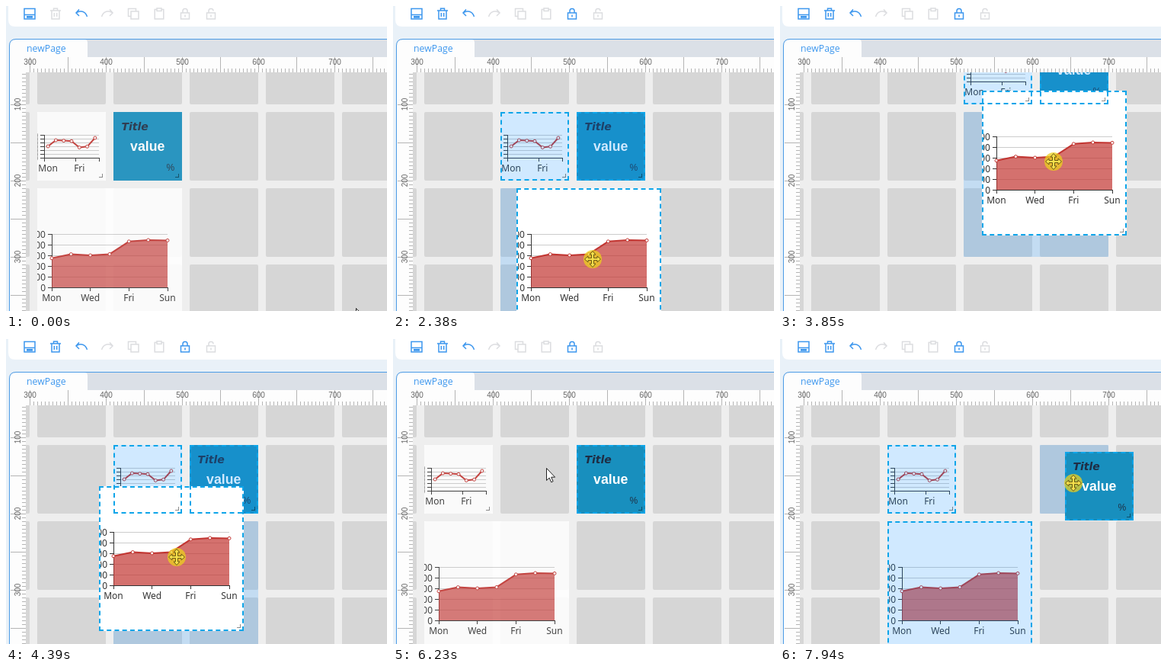
Recreate the animation shown at these times as an HTML page. Size 500x400 px, loop 8000 ms.

```html
<!DOCTYPE html>
<html lang="en">
<head>
<meta charset="utf-8">
<title>Page editor</title>
<style>
html, body { margin: 0; width: 100%; height: 100%; overflow: hidden; background: #e9f1f8; }
svg { display: block; }
#ui, #canvas { position: absolute; left: 0; top: 0; width: 500px; height: 400px; }
#canvas { clip-path: inset(87px 0 0 26px); }
.widget, .frame, #drop, #pointer { position: absolute; left: 0; top: 0; }
.widget { background: #fff; opacity: .9; }
.widget::after { content: ""; position: absolute; inset: 0; }
.frame { box-sizing: border-box; z-index: 3; }
.frame::after { content: ""; position: absolute; right: 4px; bottom: 4px; width: 4px; height: 4px; border: solid rgba(0, 0, 0, .45); border-width: 0 1.5px 1.5px 0; }
.widget.on { opacity: 1; }
.on svg { clip-path: inset(2px); }
.frame.on { border: 2px dashed #0ea5e9; }
.frame.on::after { right: 2px; bottom: 2px; }
.tint::after, #drop { background: rgba(24, 144, 255, .2); }
.top { z-index: 2; }
#pointer { overflow: visible; }
.icon { fill: none; stroke: #dcdde0; stroke-width: 1.5; }
.icon.live { stroke: #3d97ee; }
.label { font: 12px "Noto Sans", "Open Sans", sans-serif; fill: #333; }
.ruler { font: 10px "Liberation Sans", sans-serif; fill: #666; text-anchor: middle; }
</style>
</head>
<body>
<svg id="ui"></svg>
<div id="canvas"><svg id="cells" width="500" height="400"></svg><div id="drop"></div></div>
<svg id="pointer" width="1" height="1">
  <path id="arrow" d="M.5 .5V16.5L4.2 13.1 6.7 18.8 9.1 17.7 6.7 12.2H11.6Z" fill="#fff" stroke="#222"/>
  <g id="move">
    <circle r="12" fill="rgba(236,208,30,.75)"/>
    <path d="M0-10.5L4-6H1.5V-1.5H6V-4L10.5 0 6 4V1.5H1.5V6H4L0 10.5-4 6H-1.5V1.5H-6V4L-10.5 0-6-4V-1.5H-1.5V-6H-4Z" fill="#f6e04c" stroke="#6b5a14"/>
  </g>
</svg>
<script>
const $ = id => document.getElementById(id);
const range = (a, b, step) => Array.from({ length: Math.ceil((b - a) / step) }, (_, i) => a + i * step);

// Toolbar, tab and rulers
const undo = "M5 2.5L1 7 5 11M1 7C6 3.5 13 4 15.5 12";
const lock = "M2.5 7H13.5V15H2.5ZM8 9.5V12.5M5 7V4.5A3 3 0 0 1 11 4.5";
const icons = [
  "M1 1.5H15V15H1ZM1 9.5H15M4 11.8H12M4 13H12",
  "M1 4H15M5.5 4V1.2H10.5V4M3 4V15H13V4M6.3 7V12M9.7 7V12",
  undo, undo,
  "M5 5H15V15H5ZM11.5 5V1.5H1.5V11.5H5",
  "M5 2.5H2.2V15H13.8V2.5H11M5 1H11V4.5H5Z",
  lock + "V7", lock
];
const tick = n => n % 50 ? 5 : 20;
const ticks = range(31, 500, 5).map(x => `M${x + .5} 87v${-tick(x - 31)}`).join("") +
  range(89, 400, 5).map(y => `M26 ${y + .5}h${-tick(y - 129)}`).join("");

$("ui").innerHTML = `
  <path d="M3 0H500V27H12Q3 27 3 18Z" fill="#fff"/>
  <path d="M4.5 400V52Q4.5 43.5 13 43.5H500V400Z" fill="#dbe0e7"/>
  <path d="M5 67V52Q5 44 13 44H103Q107 44 107 48V67H500V400H5Z" fill="#fdfdfd"/>
  <path d="M4.5 400V52Q4.5 43.5 13 43.5H500" fill="none" stroke="#4b9be6"/>
  <text x="27" y="60" font-size="12.3" font-family="Open Sans, Noto Sans, sans-serif" fill="#3d97ee">newPage</text>
  <path d="${ticks}" stroke="#b5b5b5"/>
  ${range(300, 701, 100).map(n => `<text class="ruler" x="${n - 268.5}" y="77">${n}</text>`).join("")}
  ${range(100, 301, 100).map(n => `<text class="ruler" transform="translate(19 ${n + 29}) rotate(-90)">${n}</text>`).join("")}
  ${icons.map((d, i) => `<path class="icon" d="${d}" transform="translate(${31 + i * 34} 2) scale(${i === 3 ? -1 : 1} 1) translate(-8 0)"/>`).join("")}`;
const iconEls = document.querySelectorAll(".icon");

$("cells").innerHTML = `<rect width="500" height="400" fill="#eee"/>` +
  range(-59, 500, 100).flatMap(x => range(39, 400, 100).map(y =>
    `<rect x="${x}" y="${y}" width="90" height="90" rx="2" fill="#d6d6d6"/>`)).join("");

// Widgets
const text = (x, y, s, anchor = "middle") => `<text class="label" x="${x}" y="${y}" text-anchor="${anchor}">${s}</text>`;

function chart({ x0, x1, top, base, max, step, data, gap, days, area }) {
  const slot = (x1 - x0) / (data.length - (gap ? 0 : 1));
  const yOf = v => base - v * (base - top) / max;
  const pts = data.map((v, i) => [x0 + (i + (gap ? .5 : 0)) * slot, yOf(v)]);
  const rows = range(0, max + 1, step);
  const snap = v => Math.round(v) + .5;
  const line = "M" + pts.join("L");
  const marks = Object.keys(days).map(i => x0 + i * slot).concat(x1);
  return rows.map(v => `<path d="M${x0} ${snap(yOf(v))}H${x1}" stroke="#ccc"/>` +
      text(x0 - 8, yOf(v) + 4.5, v.toLocaleString("en-US"), "end")).join("") +
    `<path d="M${x0 + .5} ${top}V${base}M${x0} ${base + .5}H${x1 + 1}` +
      rows.map(v => `M${x0 - 5} ${snap(yOf(v))}h5`).join("") +
      marks.map(x => `M${Math.floor(x) + .5} ${base}v5`).join("") + `" stroke="#333"/>` +
    (area ? `<path d="${line}V${base}H${x0}Z" fill="#c23531" opacity=".7"/>` : "") +
    `<path d="${line}" fill="none" stroke="#c23531" stroke-width="2" stroke-linejoin="bevel"/>` +
    pts.map(([x, y]) => `<circle cx="${x}" cy="${y}" r="2" fill="#fff" stroke="#c23531"/>`).join("") +
    Object.keys(days).map(i => text(pts[i][0], base + 17.5, days[i])).join("");
}

function box(className, size) {
  const el = document.createElement("div");
  el.className = className;
  el.style.width = el.style.height = size + "px";
  $("canvas").append(el);
  return el;
}

function widget(x, y, size, body, fill = "#fff") {
  const el = box("widget", size);
  el.style.background = fill;
  el.innerHTML = `<svg width="${size}" height="${size}">${body}</svg>`;
  return { el, frame: box("frame", size), x, y, size };
}

const small = widget(41, 139, 90, chart({
  x0: 9, x1: 81, top: 30, base: 60, max: 300, step: 50, gap: true,
  data: [150, 230, 224, 218, 135, 147, 260], days: { 0: "Mon", 4: "Fri" }
}));
const card = widget(141, 139, 90, `
  <text x="10.5" y="24" font-family="DejaVu Sans, sans-serif" font-size="14" font-weight="bold" font-style="italic" fill="#1f2d44">Title</text>
  <text x="44.7" y="50.5" text-anchor="middle" font-family="Liberation Sans, sans-serif" font-size="17.7" font-weight="bold" fill="#fff">value</text>
  <text x="69.5" y="77" font-family="Liberation Sans, sans-serif" font-size="12" fill="#1f3348">%</text>`, "#188fbe");
const big = widget(41, 239, 190, chart({
  x0: 19, x1: 171, top: 60, base: 130, max: 1500, step: 300, area: true,
  data: [820, 932, 901, 934, 1290, 1330, 1320], days: { 0: "Mon", 2: "Wed", 4: "Fri", 6: "Sun" }
}));

// Each move runs from one time to another and ends at x, y; pauses lie between.
const pointerMoves = [
  [0, 0, 459, 396], [70, 500, 112, 106], [700, 1150, 274, 379], [1150, 1450, 67, 366],
  [1770, 1900, 148, 332], [4780, 5000, 352, 208], [5620, 5820, 160, 180], [6150, 6150, 271, 189],
  [6150, 6310, 133, 150], [6480, 6630, 94, 103], [6780, 7320, 327, 292], [7570, 7700, 260, 180]
];
const drags = [
  { item: big, from: 1900, to: 4700, grab: [107, 93], moves: [[1900, 2380, 121, 0], [2700, 2930, -12, 5],
    [2930, 3080, 28, -7], [3080, 3850, 224, -128], [3930, 4650, 0, 0]] },
  { item: card, from: 5860, to: 6150, grab: [19, 41], moves: [[5860, 6110, 118, 9]] },
  { item: card, from: 7710, to: 8000, grab: [19, 41], moves: [[7710, 7940, 133, 9]] }
];

function at(moves, t) {
  let x = 0, y = 0;
  for (const [from, to, tx, ty] of moves) {
    if (t < from) break;
    const f = t >= to ? 1 : (t - from) / (to - from);
    x += (tx - x) * f;
    y += (ty - y) * f;
  }
  return [x, y];
}
const within = (t, a, b) => t >= a && t < b;
const place = (el, x, y) => el.style.transform = `translate(${Math.round(x)}px,${Math.round(y)}px)`;

function draw(t) {
  const drag = drags.find(d => within(t, d.from, d.to));
  const offset = drag ? at(drag.moves, t) : [0, 0];
  const snapped = offset.map(v => Math.round(v / 100) * 100);
  const late = t >= 7000;
  const selected = new Map([
    [small, within(t, 780, 5400) || late],
    [card, within(t, 780, 5400) || within(t, 5840, 6780) || late],
    [big, within(t, 1000, 5400) || late]
  ]);
  card.x = t < 6150 ? 141 : 241;

  for (const [w, on] of selected) {
    const held = !!drag && drag.item === w;
    const follows = !!drag && on && !held;
    const [dx, dy] = held ? offset : follows ? snapped : [0, 0];
    for (const el of [w.el, w.frame]) {
      el.classList.toggle("on", on);
      place(el, w.x + dx, w.y + dy);
    }
    w.el.classList.toggle("tint", follows);
    w.el.classList.toggle("top", held);
  }

  const any = [...selected.values()].includes(true);
  iconEls.forEach((el, i) => el.classList.toggle("live", i === 0 || i === 2 || (any && (i === 1 || i === 6))));

  const drop = $("drop");
  drop.style.display = drag ? "block" : "none";
  $("arrow").style.display = drag ? "none" : "";
  $("move").style.display = drag ? "" : "none";
  if (drag) {
    const { item, grab } = drag;
    drop.style.width = drop.style.height = item.size + "px";
    place(drop, item.x + snapped[0], item.y + snapped[1]);
    // the pointer trails the widget slightly sideways
    place($("pointer"), item.x + grab[0] + offset[0] * .94, item.y + grab[1] + offset[1]);
  } else {
    place($("pointer"), ...at(pointerMoves, t));
  }
}

const start = performance.now();
function loop() {
  draw((performance.now() - start) % 8000);
  requestAnimationFrame(loop);
}
loop();
</script>
</body>
</html>
```
